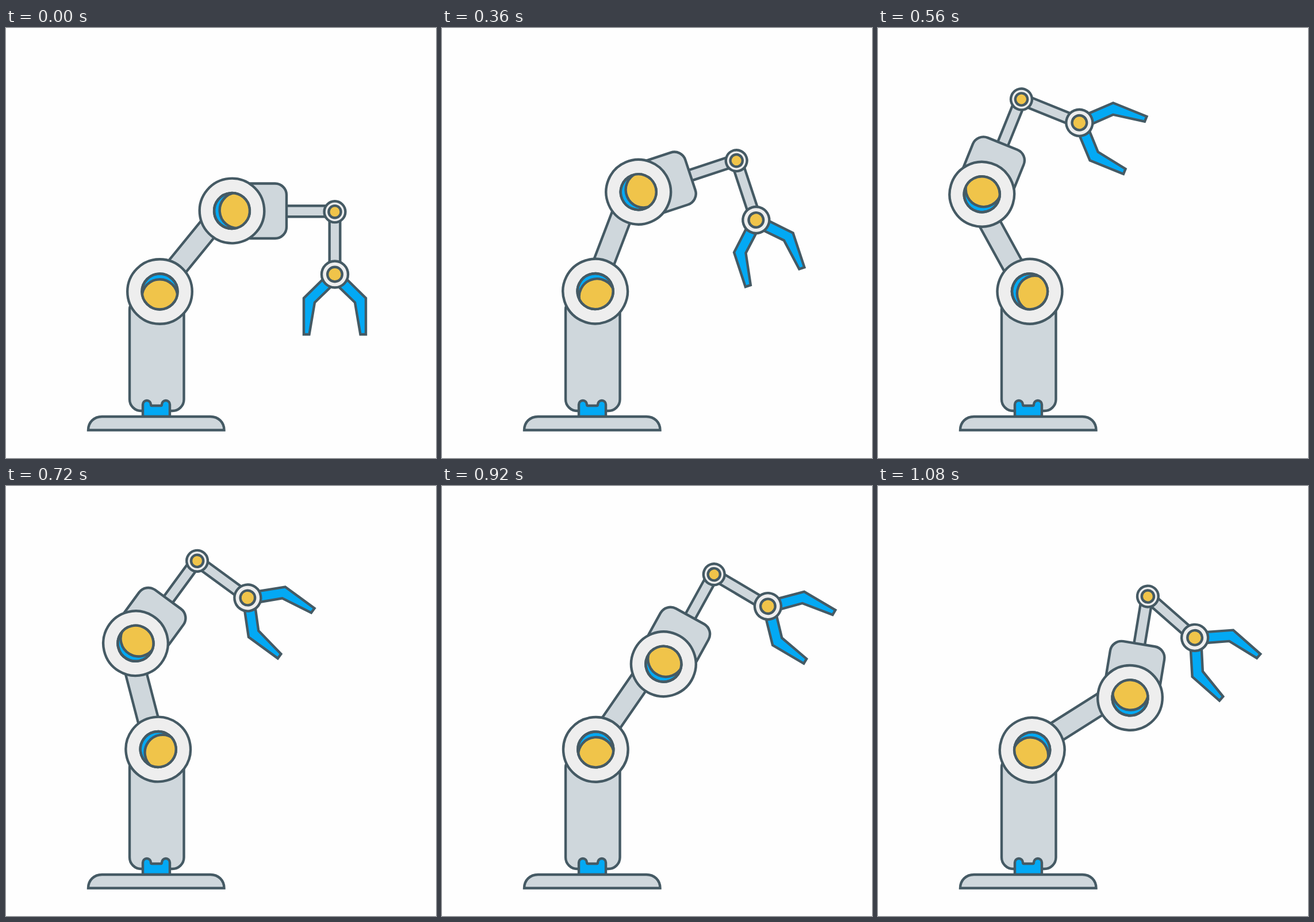
An HTML page that plays this animation: 748x748 px, repeating every 1120 ms.

```html
<!DOCTYPE html>
<html lang="en">
<head>
<meta charset="utf-8">
<title>Robot arm</title>
<style>
html, body { margin: 0; height: 100%; overflow: hidden; background: #fefefe; }
svg { display: block; width: 100vw; height: 100vh; stroke: #455a64; stroke-width: 4.4; }
.steel { fill: #cfd7dc; }
.pale { fill: #eee; }
.blue { fill: #03a9f4; }
.gold { fill: #f0c44a; }
</style>
</head>
<body>
<svg viewBox="0 0 748 748">
  <defs>
    <clipPath id="hole"><circle r="31"/></clipPath>
    <g id="joint">
      <circle class="pale" r="56.3"/>
      <circle class="blue" r="31"/>
      <g clip-path="url(#hole)"><circle class="gold" cy="9.7" r="31"/></g>
      <circle fill="none" r="31"/>
    </g>
    <path id="finger" class="blue" d="M-12 0L-54 41.5V104.5H-44.5L-35 49L0 15Z"/>
  </defs>

  <rect class="steel" x="215" y="470" width="94.5" height="196" rx="20"/>
  <path class="blue" d="M238 676V655a7 7 0 0 1 14 0q0 2 2 2H269q2 0 2-2a7 7 0 0 1 14 0V676Z"/>
  <path class="steel" d="M143 699.5C143 686 153 676 167 676H355.5C369.5 676 379.5 686 379.5 699.5Z"/>

  <g id="arm">
    <rect class="steel" x="-18" y="-70" width="36" height="140" transform="translate(324.7 382) rotate(39.2)"/>
    <use href="#joint" transform="translate(267.5 458.5)"/>
    <g id="forearm">
      <rect class="steel" x="470" y="309.3" width="95" height="19"/>
      <rect class="steel" x="405" y="270.5" width="83" height="95.5" rx="20"/>
      <use href="#joint" transform="translate(393 318) rotate(-95)"/>
      <g id="hand">
        <rect class="steel" x="562.7" y="320" width="18.6" height="108"/>
        <circle class="pale" cx="572" cy="319.7" r="18.4"/>
        <circle class="gold" cx="572" cy="319.7" r="10.6"/>
        <g transform="translate(572 428.5)">
          <use href="#finger"/>
          <use href="#finger" transform="scale(-1 1)"/>
          <circle class="pale" r="23"/>
          <circle class="gold" r="12.8"/>
        </g>
      </g>
    </g>
  </g>
</svg>
<script>
const LOOP = 1120, STEP = 40;

// Like CSS cubic-bezier(x1, 0, x2, 1)
function ease(u, x1, x2) {
  let lo = 0, hi = 1;
  for (let i = 0; i < 20; i++) {
    const s = (lo + hi) / 2, r = 1 - s;
    if (3 * s * r * (r * x1 + s * x2) + s ** 3 < u) lo = s; else hi = s;
  }
  return lo * lo * (3 - 2 * lo);
}

// Part of a swing from start to end (ms) that is done at time t
function swing(t, start, end, x1, x2) {
  const u = Math.min(1, Math.max(0, (t - start) / (end - start)));
  return ease(u, x1, x2);
}

function turn(id, angle, x, y) {
  document.getElementById(id).setAttribute('transform', `rotate(${angle} ${x} ${y})`);
}

function draw() {
  const t = Math.floor(performance.now() % LOOP / STEP) * STEP;
  const raise = t < 280 ? 0 : swing(t, 240, 600, .4, .52);
  const lower = swing(t, 600, 1080, .28, .7);
  turn('arm', 87.8 * lower - 69.3 * raise, 265.6, 461);
  turn('forearm', -99.1 * swing(t, 720, 1080, .33, .69), 396.7, 315.1);
  turn('hand', 31.9 * swing(t, 880, 1080, .52, .66), 572, 319.7);
  requestAnimationFrame(draw);
}
draw();
</script>
</body>
</html>
```
